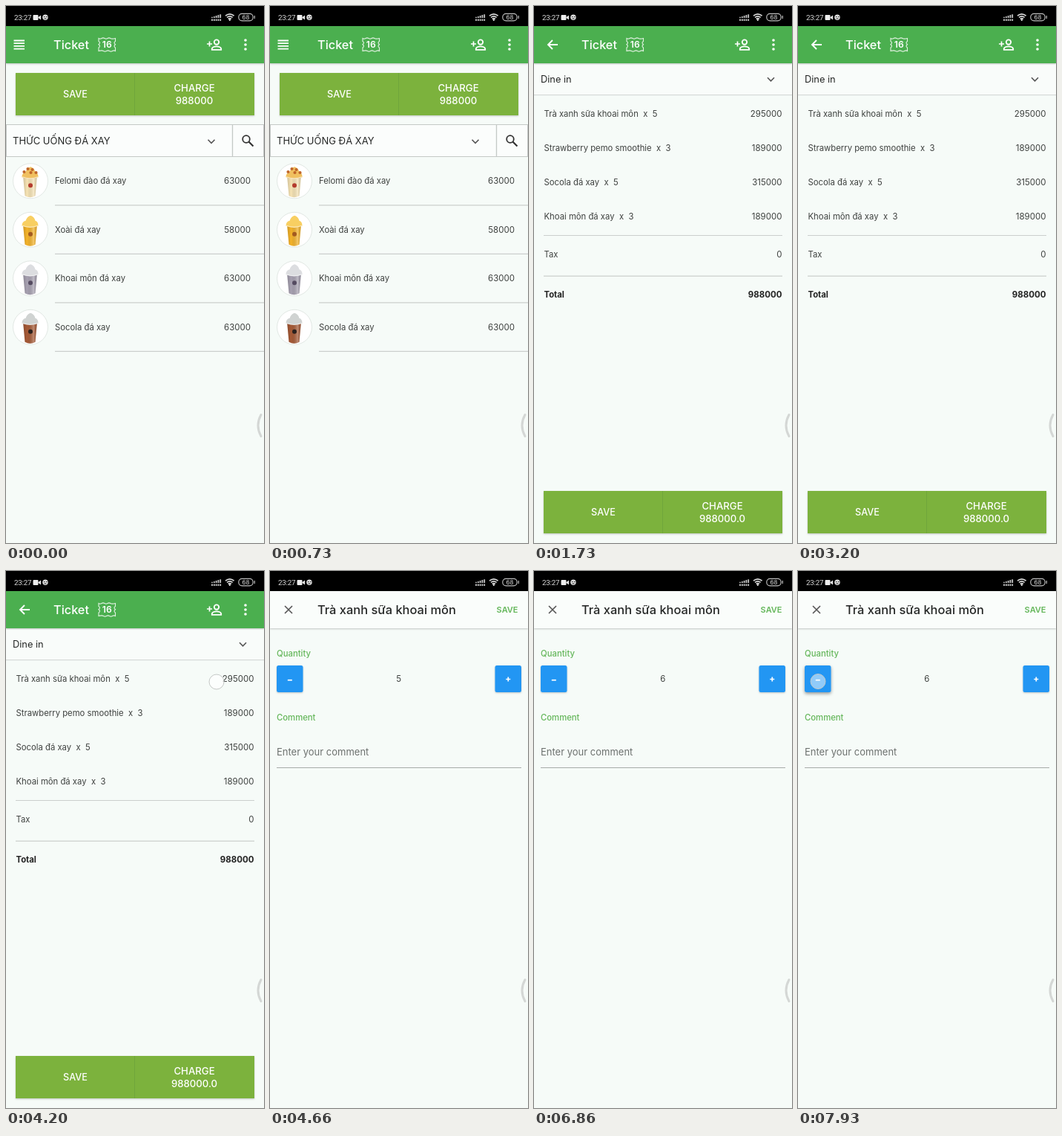
These frames come from a looping animation (348 by 722 pixels, 8000 ms). An HTML page:

```html
<!DOCTYPE html>
<html lang="en">
<head>
<meta charset="utf-8">
<title>Ticket editing</title>
<style>
html, body { margin: 0; width: 100%; height: 100%; overflow: hidden; background: #f6fbf8; }
svg { display: block; width: 100vw; height: 100vh; }
text { font-family: Inter, Roboto, sans-serif; white-space: pre; }
</style>
</head>
<body>
<svg id="stage" viewBox="0 0 348 722"></svg>
<script>
const LOOP = 8000;
const stage = document.getElementById('stage');
const INK = '#3e413f', GREEN = '#4caf50', BLUE = '#2196f3';

const text = (x, y, s, size = 11.3, fill = INK, more = '') =>
  `<text x="${x}" y="${y}" font-size="${size}" fill="${fill}" ${more}>${s}</text>`;
const rect = (x, y, w, h, fill, more = '') =>
  `<rect x="${x}" y="${y}" width="${w}" height="${h}" fill="${fill}" ${more}/>`;
const line = (d, stroke, width = 1, more = '') =>
  `<path d="${d}" fill="none" stroke="${stroke}" stroke-width="${width}" ${more}/>`;
const shape = (d, fill, more = '') => `<path d="${d}" fill="${fill}" ${more}/>`;
const dot = (x, y, r, fill, more = '') =>
  `<circle cx="${x}" cy="${y}" r="${r}" fill="${fill}" ${more}/>`;
const END = 'text-anchor="end"', MID = 'text-anchor="middle"';

function statusBar() {
  let bars = '';
  for (let i = 0; i < 5; i++) {
    const x = 278 + i * 2.8;
    bars += line(`M${x} 20v-2.6M${x} 16v${-1.2 - i * 0.9}`, '#c4c4c4', 1.8);
  }
  return rect(0, 0, 348, 27, '#000') +
    text(11, 19.3, '23:27', 9.8, '#dcdcdc', 'style="font-family:Roboto,sans-serif" letter-spacing="-.2"') +
    rect(36.5, 12, 7, 7, '#eee', 'rx="1"') + shape('M43 15.5l4-3v6z', '#eee') +
    dot(53, 15.3, 3.7, '#ddd') + line('M51 14.5h1.5M54 14.5h1.5M51.5 17h3', '#222') + bars +
    line('M296 13.2q5.8-4.6 11.6 0M298 15.4q3.8-3 7.6 0M299.8 17.5q2-1.6 4 0', '#ddd', 1.7) +
    dot(301.8, 18.8, 1.2, '#ddd') +
    rect(313.8, 10.4, 19.4, 9.4, 'none', 'rx="4.5" stroke="#bdbdbd" stroke-width="1.2"') +
    line('M335.3 13v4', '#bdbdbd', 1.2) + text(323.5, 18, '68', 8, '#ddd', MID);
}

function ticketBar(nav) {
  return rect(0, 27, 348, 50, GREEN, 'filter="url(#lift)"') + nav +
    text(64, 57.8, 'Ticket', 16.3, '#fff', 'font-weight="500"') +
    line('M125 43.5q2 1.2 4 0t4 0t4 0t4 0t6.5 0v4q-3 2 0 4.2q-3 2.2 0 4.3v4.5q-2-1.2-4 0t-4 0t-4 0t-4 0t-6.5 0v-4.5q3-2.1 0-4.3q3-2.2 0-4.2z', '#e3f2e3', 1.1) +
    text(136.3, 56.4, '16', 12.2, '#fff', MID + ' font-weight="600"') +
    line('M271 51h7M274.5 47.5v7', '#fff', 1.7) +
    dot(284, 48.6, 3.2, 'none', 'stroke="#fff" stroke-width="1.9"') +
    line('M277.8 58.8v-1.4q1-3 6.2-3t6.2 3v1.4z', '#fff', 1.8) +
    [46, 52, 58].map(y => dot(323, y, 1.8, '#fff')).join('');
}

function actions(y, amount) {
  return rect(13, y, 322, 57, '#7bb23e', 'filter="url(#lift)"') +
    line(`M173.5 ${y}v57`, '#70a53c') +
    text(93.5, y + 32.5, 'SAVE', 12.7, '#fff', MID + ' font-weight="500"') +
    text(254, y + 24.5, 'CHARGE', 13.2, '#fff', MID + ' font-weight="500"') +
    text(254, y + 41.5, amount, 13.2, '#fff', MID + ' font-weight="500"');
}

const chevron = (x, y) => line(`M${x - 4.5} ${y - 2.3}l4.5 4.6l4.5-4.6`, '#555', 1.6);

function cup(y, body, top, mark) {
  const side = 'M-9.5-7L-7 20Q0 24 7 20L9.5-7z';
  return dot(33, y, 23.5, '#fff', 'stroke="#e2e8e4"') +
    `<g transform="translate(32.5 ${y})">` +
    shape(side, body) + shape(side, 'url(#round)') +
    shape('M-11-5Q-11-11-6-12Q-4-18 1-19Q6-17 7-12Q11-11 11-5Q0-1-11-5z', top) +
    line('M-10.5-5.5Q0-1.5 10.5-5.5', '#fff', 1.2, 'opacity=".6"') +
    dot(0.5, 6, 3, mark) + '</g>';
}

function listScreen() {
  const items = [
    ['Felomi đào đá xay', 63000, '#f6e3b4', '#f0c060', '#b43b2d'],
    ['Xoài đá xay', 58000, '#f4b32a', '#f8cf62', '#a35a20'],
    ['Khoai môn đá xay', 63000, '#a7a1b1', '#dcdde0', '#554b61'],
    ['Socola đá xay', 63000, '#a65a36', '#d0d3d2', '#2b211e']
  ];
  const rows = items.map(([name, price, body, top, mark], i) => {
    const y = 235.3 + i * 65.5;
    return cup(y, body, top, mark) + text(66, y + 3.8, name) + text(330, y + 3.8, price, 11.5, INK, END) +
      line(`M66 ${y + 32.6}H348`, '#cbcfcd', 1.4);
  }).join('');
  const crumbs = [[-8, -12], [-3, -16], [3, -15], [8, -11], [1, -11]]
    .map(([x, y]) => dot(32.5 + x, 235 + y, 2.1, '#c0662a')).join('');
  return ticketBar(line('M10.5 46.5h14.5M10.5 50.2h14.5M10.5 53.9h14.5M10.5 57.6h14.5', '#fff', 1.8)) +
    actions(90, '988000') +
    rect(0.5, 159.5, 347, 43, '#fbfdfc', 'stroke="#c4c9c6"') + line('M305.5 160v42', '#c4c9c6', 1.3) +
    text(9, 186, 'THỨC UỐNG ĐÁ XAY', 13, '#252726') + chevron(277, 182) +
    dot(324, 179, 4.8, 'none', 'stroke="#333" stroke-width="1.8"') + line('M327.5 182.5l6 6', '#333', 2.2) +
    rows + crumbs;
}

function ticketScreen() {
  const items = [
    ['Trà xanh sữa khoai môn  x  5', 295000],
    ['Strawberry pemo smoothie  x  3', 189000],
    ['Socola đá xay  x  5', 315000],
    ['Khoai môn đá xay  x  3', 189000]
  ];
  const row = (y, name, price, more = '') =>
    text(13.5, y, name, 11.3, INK, more) + text(334.5, y, price, 11.5, INK, END + ' ' + more);
  return ticketBar(line('M32 52H19M25 46l-6 6l6 6', '#fff', 1.9)) +
    rect(0, 79, 348, 41, '#f9fcfa') + line('M0 119.7H348', '#cfd3d1') +
    text(9, 102.5, 'Dine in', 12.8, '#252726') + chevron(319.5, 98.5) +
    items.map(([name, price], i) => row(148.8 + i * 46, name, price)).join('') +
    line('M13 308.5H335M13 363.2H335', '#cbcfcd', 1.2) +
    row(337.5, 'Tax', 0) + row(391.7, 'Total', 988000, 'font-weight="700" style="fill:#222"') +
    actions(652, '988000.0');
}

function editScreen() {
  const key = (x, id, sign) =>
    rect(x, 127, 35.5, 36, BLUE, `id="${id}" rx="2.5" filter="url(#lift)"`) +
    line(sign, '#fff', 1.7);
  return rect(0, 27, 348, 50, '#fafdfb', 'filter="url(#lift)"') +
    line('M20 47l10 10M30 47l-10 10', '#555', 1.6) +
    text(64, 57.8, 'Trà xanh sữa khoai môn', 16.45, '#252726', 'font-weight="500"') +
    text(334.5, 55.7, 'SAVE', 11, '#65b75b', END + ' font-weight="600"') +
    text(9, 114.7, 'Quantity', 11.3, '#65b75b', 'font-weight="500"') +
    key(9, 'minus', 'M23.8 146.7h6') + key(303.5, 'plus', 'M318.3 145.5h6M321.3 142.5v6') +
    text(173.7, 148.8, '5', 11.5, INK, MID + ' id="count"') +
    text(9, 200.5, 'Comment', 11.3, '#65b75b', 'font-weight="500"') +
    text(9, 247.8, 'Enter your comment', 13, '#6d716f') + line('M9 264.5H339', '#a7aba9', 1.2);
}

stage.innerHTML = `<defs>
  <linearGradient id="round"><stop offset="0" stop-opacity=".16"/><stop offset=".3" stop-opacity="0"/>
    <stop offset=".75" stop-color="#fff" stop-opacity=".3"/><stop offset="1" stop-opacity=".12"/></linearGradient>
  <filter id="lift" x="-20%" y="-20%" width="140%" height="150%"><feDropShadow dx="0" dy="1" stdDeviation="1" flood-opacity=".22"/></filter>
  <filter id="raise" x="-40%" y="-40%" width="180%" height="190%"><feDropShadow dx="0" dy="2" stdDeviation="2.2" flood-opacity=".4"/></filter></defs>` +
  ['list', 'ticket', 'edit'].map((id, i) => `<g id="${id}">${rect(0, 0, 348, 722, '#f6fbf8')}` +
    [listScreen, ticketScreen, editScreen][i]() + '</g>').join('') +
  statusBar() + line('M344 549.5Q336 564 344 578.5', '#d4d7d5', 3, 'stroke-linecap="round"') +
  dot(0, 0, 10, '#fff', 'id="touch" stroke="#c5c9c7" stroke-width="1"');

const $ = id => document.getElementById(id);
const ramp = (t, from, to) => Math.max(0, Math.min(1, (t - from) / (to - from)));
const taps = [
  { x: 284, y: 149, from: 4130, to: 4360 },
  { x: 321, y: 148, from: 6620, to: 6820, key: 'plus' },
  { x: 27, y: 148.5, from: 7850, to: LOOP + 200, key: 'minus' }
];

function draw(t) {
  const ticket = ramp(t, 790, 880), edit = ramp(t, 4400, 4560);
  $('list').style.display = ticket < 1 ? '' : 'none';
  $('ticket').style.display = edit < 1 ? '' : 'none';
  $('ticket').setAttribute('opacity', ticket);
  $('edit').setAttribute('opacity', edit);
  $('count').textContent = t < 6820 ? 5 : 6;

  const tap = taps.find(p => t >= p.from && t < p.to);
  for (const id of ['minus', 'plus'])
    $(id).setAttribute('filter', `url(#${tap && tap.key === id ? 'raise' : 'lift'})`);
  const touch = $('touch');
  touch.style.display = tap ? '' : 'none';
  if (!tap) return;
  touch.setAttribute('cx', tap.x);
  touch.setAttribute('cy', tap.y);
  touch.setAttribute('opacity', Math.min(ramp(t, tap.from - 20, tap.from + 40), 1 - ramp(t, tap.to - 80, tap.to)));
  touch.setAttribute('fill-opacity', tap.key ? 0.5 : 0.65);
}

function tick(now) {
  draw(now % LOOP);
  requestAnimationFrame(tick);
}
draw(0);
requestAnimationFrame(tick);
</script>
</body>
</html>
```
